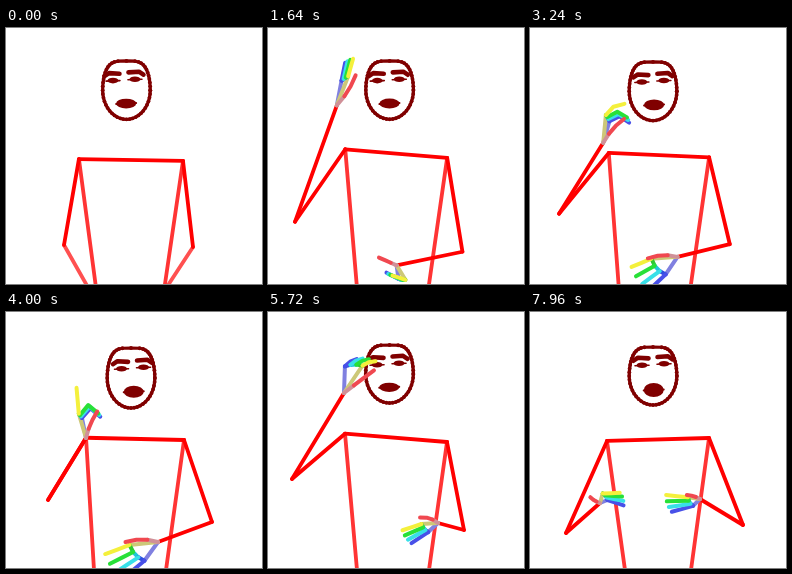
An HTML page with a canvas for the animation above (8 s loop, 256 px wide and 256 px high).

```html
<!DOCTYPE html>
<html lang="en">
<head>
<meta charset="utf-8">
<title>Signing figure</title>
<style>
  html, body { margin: 0; width: 100%; height: 100%; overflow: hidden; background: #fff; }
  canvas { display: block; width: 100vw; height: 100vh; }
</style>
</head>
<body>
<canvas id="stage" width="256" height="256"></canvas>
<script>
const ctx = document.getElementById('stage').getContext('2d');
const LOOP = 8000, STEP = 40;
const RED = '#ff0000', DARK = '#800000';
const FINGERS = ['#f4f03c', '#28e038', '#38e0e8', '#4850e8'];
const KNUCKLES = ['#30c830', '#20c8d8', '#3050e0'];

// Hand shape: palm angle, fan and radius; finger aim, length and curl; thumb angle; straight index
const hand = (...v) => v.length < 8 ? [...v, 0] : v;
const fan = hand(-23, 42, 29, -20, 12, 0, -72);
const raised = hand(-88, -25, 28, -92, 20, 0, -54);
const bent = hand(-60, 15, 27, -10, 20, 35, -35);
const pointing = hand(-104, 5, 23, -50, 26, 90, -67, 1);
const folded = hand(-72, -32, 30, -35, 14, 20, -37);
const blade = hand(-60, -9, 28, -54, 20, 0, -50);
const level = hand(-48, 52, 9, 8, 17, 0, -149);
const low = hand(5, 87, 10, 250, 10, 0, 227);
const open = hand(150, -55, 22, 145, 18, 0, 175);
const wide = hand(150, -48, 26, 150, 26, 0, 180);
const small = hand(157, -39, 15, 154, 20, 0, 197);
const side = hand(138, -27, 10, 162, 17, 0, 190);
const across = hand(162, -53, 11, 175, 22, 0, 197);

// Key poses of each arm: time, elbow, wrist, hand shape
const leftArm = [
  [0, 58, 217, 105, 300, ...fan],
  [800, 45, 222, 101, 169, ...fan],
  [2000, 22, 186, 60, 52, ...raised],
  [2600, 19, 184, 68, 106, ...bent],
  [4000, 42, 188, 80, 126, ...pointing],
  [5300, 18, 160, 62, 48, ...raised],
  [5720, 24, 167, 76, 81, ...folded],
  [6840, 27, 153, 53, 75, ...blade],
  [7960, 36, 221, 70, 191, ...level]
];
const rightArm = [
  [0, 187, 219, 134, 300, ...low],
  [800, 194, 226, 116, 245, ...low],
  [2600, 195, 221, 144, 228, ...open],
  [4000, 206, 210, 152, 230, ...wide],
  [5720, 196, 218, 170, 211, ...small],
  [6840, 191, 219, 185, 194, ...side],
  [7960, 213, 213, 170, 187, ...across]
];

const ease = u => u * u * (3 - 2 * u);

function poseAt(keys, t) {
  let i = 0;
  while (i < keys.length - 2 && t >= keys[i + 1][0]) i++;
  const [a, b] = [keys[i], keys[i + 1]];
  const u = ease(Math.min(1, (t - a[0]) / (b[0] - a[0])));
  const [ex, ey, wx, wy, ...shape] = a.slice(1).map((v, n) => v + (b[n + 1] - v) * u);
  return { elbow: [ex, ey], wrist: [wx, wy], shape };
}

// Head and torso lean by a weight at each beat: start, chest, cheek, point, wave, rest
const BEATS = [[0, 500], [800, 500], [2600, 700], [4000, 700], [6840, 450], [7960, 450]];
function swayAt(t) {
  const beat = BEATS.map(([mid, width]) => Math.exp(-(((t - mid) / width) ** 2)));
  return (base, ...weights) => weights.reduce((sum, w, i) => sum + w * beat[i], base);
}

function line(color, width, ...pts) {
  ctx.strokeStyle = color;
  ctx.lineWidth = width;
  ctx.beginPath();
  pts.forEach(p => ctx.lineTo(p[0], p[1]));
  ctx.stroke();
}

function ellipse(x, y, rx, ry, color) {
  ctx.fillStyle = color;
  ctx.beginPath();
  ctx.ellipse(x, y, rx, ry, 0, 0, 2 * Math.PI);
  ctx.fill();
}

function polar([x, y], degrees, r) {
  const a = degrees * Math.PI / 180;
  return [x + r * Math.cos(a), y + r * Math.sin(a)];
}

function drawBody(sway, left, right) {
  // A raised hand lifts its shoulder
  const lift = Math.exp(-Math.max(0, left.wrist[1] - 75) / 90);
  const ls = [sway(77, -4, -1, 2, 3, 7), 132 - 11 * lift];
  const rs = [sway(179, -2, 0, 1, -1, 2), sway(130, 3, -2, 0, -2, 4, -4)];
  line('#ff3434', 3.8, ls, [sway(89, 1, -3, 0, -1, 3, 6), 258]);
  line('#ff3434', 3.8, rs, [sway(161, -2, -4, 0, -1, -5), 258]);
  for (const [shoulder, { elbow, wrist }] of [[ls, left], [rs, right]]) {
    line(wrist[1] > 270 ? '#ff5050' : RED, 3.8, elbow, wrist);
    line(RED, 3.8, shoulder, elbow);
  }
  line(RED, 3.8, ls, rs);
}

function drawFace(sway) {
  const cx = sway(121.5, -1, -.5, 1, 3.5, 8.5, 1.5);
  const cy = sway(62, 0, 2, 0, 4, 3, 2);
  const ry = sway(29, 0, 2.5, 0, 1, -1);

  // Broad, flat forehead above an elliptical jaw
  const rim = [];
  for (let i = 0; i <= 48; i++) {
    const q = i / 24 * Math.PI, x = Math.cos(q), y = Math.sin(q);
    const half = y < 0 ? Math.sign(x) * Math.sqrt(Math.abs(x)) : x;
    rim.push([cx + 23.8 * half, cy + ry * y]);
  }
  line(DARK, 3.2, ...rim);
  rim.forEach(([x, y]) => ellipse(x, y, 1.9, 1.9, DARK));

  const ex = cx + sway(-1.5, -1, 0, 1, 3, 0, 1.5);
  const ey = cy + sway(-10, 0, -3.5, 0, 0, -1, -1.5);
  for (const s of [-1, 1]) {
    const x = ex + 11 * s, y = ey - s * .7;
    line(DARK, 4.6, [x + 8.5 * s, y - 4.5], [x + 4 * s, y - 7.5], [x - 6.5 * s, y - 6.8]);
    ellipse(x, y, 5.5, 2.8, DARK);
    line(DARK, 1.6, [x - 7, y + .5], [x + 7, y]);
  }

  const mx = cx + sway(-.3, 0, 0, 1, 3, 0, 1);
  const my = cy + sway(13.3, 0, 1.5, .5, .5, 0, .7);
  ellipse(mx, my, 10, sway(4.6, 0, 4.3, .8, 1.4, 1.8, 2.3), DARK);
  line(DARK, 2, [mx - 10, my + .5], [mx + 10, my - .5]);
  const gap = sway(0, 0, 4);
  if (gap > 1) ellipse(mx, my + 1, gap * 1.4, gap * .8, '#fff');
}

function drawHand({ wrist, shape }) {
  const [angle, spread, palm, aim, length, curl, thumb, straight] = shape;
  const W = 4;

  const fingers = FINGERS.map((color, i) => {
    const off = spread * (i / 3 - .5);
    const free = i ? 0 : straight;
    const base = polar(wrist, angle + off, palm * (1.1 - .07 * i));
    const dir = aim + .4 * off + free * (angle + 10 - aim);
    const mid = polar(base, dir, length / 2);
    return [base, mid, polar(mid, dir + curl * (1 - free), length / 2)];
  });

  // The thumb bows away from the fingers
  const bow = -12 * Math.sin((aim - thumb) * Math.PI / 180);
  const [t1, t2, t3] = [bow, bow, 0].map((turn, i) =>
    polar(wrist, thumb + turn * (2 - i), palm * 1.25 * (i + 1) / 3));

  line('#8080e0', W, wrist, fingers[3][0]);
  line('#cdc878', W, wrist, fingers[0][0]);
  line('#d09098', W, wrist, t1);
  KNUCKLES.forEach((color, i) => line(color, W, fingers[i][0], fingers[i + 1][0]));
  for (let i = 3; i >= 0; i--) line(FINGERS[i], W, ...fingers[i]);
  line('#f04850', W, t1, t2, t3);
}

function draw(now) {
  let t = Math.floor(now % LOOP / STEP) * STEP;
  if (t < 2 * STEP) t = 0;
  ctx.fillStyle = '#fff';
  ctx.fillRect(0, 0, 256, 256);
  ctx.lineCap = ctx.lineJoin = 'round';
  const left = poseAt(leftArm, t), right = poseAt(rightArm, t), sway = swayAt(t);
  drawBody(sway, left, right);
  drawFace(sway);
  drawHand(left);
  drawHand(right);
}

const start = performance.now();
function tick() {
  draw(performance.now() - start);
  requestAnimationFrame(tick);
}
tick();
</script>
</body>
</html>
```
